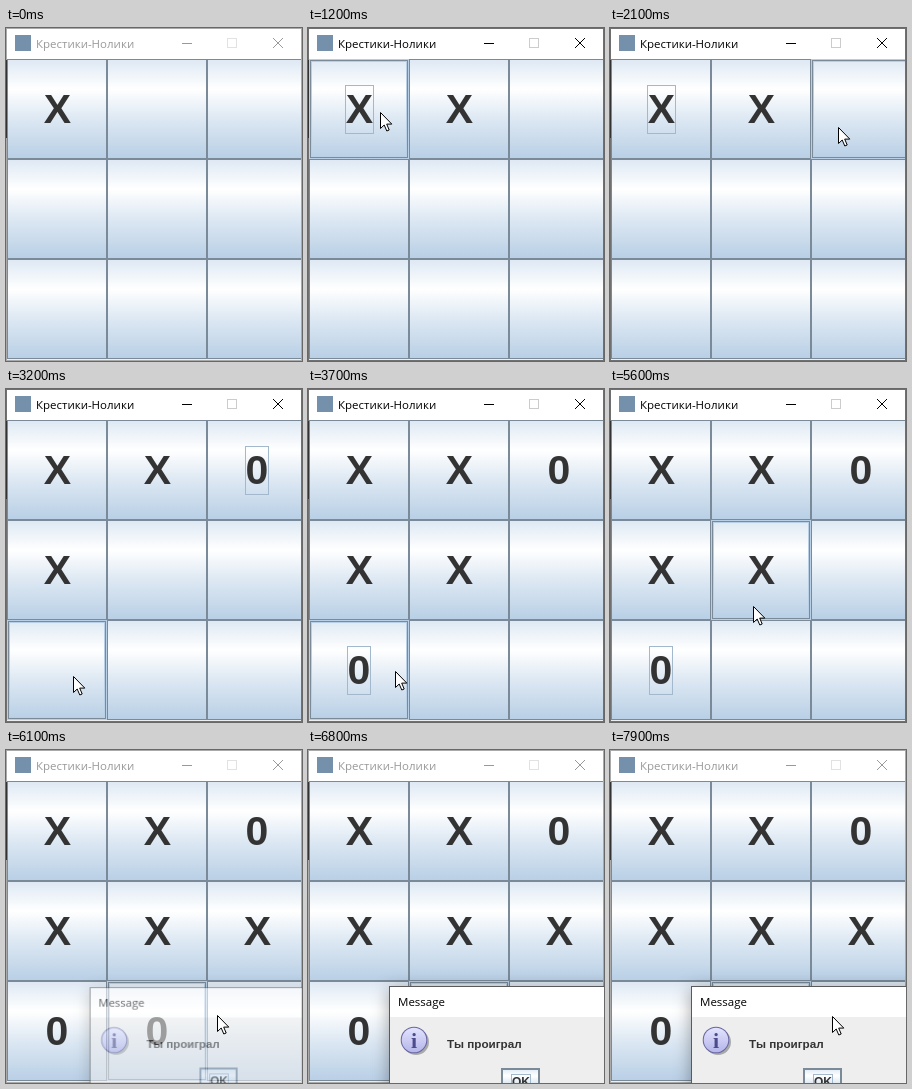
Write an HTML page with a canvas that moves like this. It is 296 by 333 pixels and loops after 8 s.

```html
<!DOCTYPE html>
<html lang="ru">
<head>
<meta charset="utf-8">
<style>
html, body { margin: 0; width: 100%; height: 100%; overflow: hidden; }
canvas { display: block; }
</style>
</head>
<body>
<canvas id="stage" width="296" height="333"></canvas>
<script>
const LOOP = 8000, STEP = 100, CELL = 100;
const DIALOG_AT = 6100, FADE = 200;
const UI = '11.5px "Open Sans", "Noto Sans", sans-serif';
const BOLD = '"Liberation Sans", Arial, sans-serif';
const EDGE = '#7a8a99', GLOW = '#b8cfe5', FOCUS = '#a3b8cc';
const ctx = document.getElementById('stage').getContext('2d');

// Each click may place a 0; the computer answers with an X on release
const turns = [
  { cell: 0, press: 1000, release: 1200, reply: 1 },
  { cell: 2, press: 2200, release: 2300, reply: 3 },
  { cell: 6, press: 3400, release: 3500, reply: 4 },
  { cell: 7, press: 5800, release: 5900, reply: 5 }
];

// Pointer glides from rest to rest: [start, end, x, y]
const origin = [62, 21];
const glides = [
  [400, 800, 72, 84], [1200, 1600, 163, 123], [1700, 2100, 228, 99],
  [2800, 3200, 67, 287], [3500, 4400, 227, 245], [4400, 5400, 143, 217],
  [5600, 5800, 152, 262], [6000, 6100, 211, 265], [6100, 6900, 230, 345],
  [7100, 7400, 210, 249], [7500, 7800, 222, 313], [7800, 7900, 222, 266]
];
const arrow = new Path2D('M.5 .5V16.5L4.2 13L6.8 19L9.2 18L6.7 12.1H11.8Z');

const progress = (t, from, to) => Math.min(1, Math.max(0, (t - from) / (to - from)));
const ease = k => k * k * (3 - 2 * k);

function fill(g, color, x, y, w, h) {
  g.fillStyle = color;
  g.fillRect(x, y, w, h);
}

function frame(g, color, x, y, w, h) {
  g.strokeStyle = color;
  g.strokeRect(x + .5, y + .5, w - 1, h - 1);
}

function text(g, str, font, color, x, y) {
  g.font = font;
  g.fillStyle = color;
  g.fillText(str, x, y);
}

function disc(g, color, x, y, r) {
  g.fillStyle = color;
  g.beginPath();
  g.arc(x, y, r, 0, 7);
  g.fill();
}

function gradient(g, y, h, stops) {
  const shade = g.createLinearGradient(0, y, 0, y + h);
  for (const [at, color] of stops) shade.addColorStop(at, color);
  return shade;
}

function button(g, x, y, w, h, hover, pressed) {
  const shade = gradient(g, y, h, [[0, '#dde8f3'], [.3, '#fff'], [.6, '#dde8f3'], [1, GLOW]]);
  fill(g, pressed ? GLOW : shade, x, y, w, h);
  const rings = hover ? [GLOW, EDGE, GLOW] : [EDGE];
  rings.forEach((color, i) => frame(g, color, x + i, y + i, w - 2 * i, h - 2 * i));
}

function makeDialog() {
  const layer = document.createElement('canvas');
  layer.width = layer.height = 380;
  const g = layer.getContext('2d');
  g.shadowColor = 'rgba(0,0,0,.35)';
  g.shadowBlur = 16;
  g.shadowOffsetY = 3;
  fill(g, '#5a5a5a', 81, 236, 262, 115);
  g.shadowColor = 'transparent';
  fill(g, '#fff', 82, 237, 260, 30);
  fill(g, '#eee', 82, 267, 260, 83);
  text(g, 'Message', UI, '#000', 90, 256);

  disc(g, '#aaa', 108, 292, 13);
  disc(g, '#6666a0', 106, 290, 13.3);
  disc(g, gradient(g, 277, 26, [[0, '#e4e4ff'], [1, '#b4b4ea']]), 106, 290, 12.3);
  text(g, 'i', 'bold 22px "Liberation Serif", serif', '#4c4c8c', 103, 298);

  text(g, 'Ты проиграл', 'bold 11.7px ' + BOLD, '#333', 139, 298);
  button(g, 193, 318, 39, 26);
  frame(g, EDGE, 194, 319, 37, 24);
  frame(g, FOCUS, 203, 324, 20, 16);
  text(g, 'OK', 'bold 12px ' + BOLD, '#333', 204, 336);
  return layer;
}
const dialog = makeDialog();

function pointer(t) {
  let [x, y] = origin;
  for (const [from, to, toX, toY] of glides) {
    const k = ease(progress(t, from, to));
    x += (toX - x) * k;
    y += (toY - y) * k;
  }
  return [Math.round(x), Math.round(y)];
}

function cellAt([x, y]) {
  return y < 31 ? -1 : Math.floor((x - 1) / CELL) + 3 * Math.floor((y - 31) / CELL);
}

function markAt(n, t) {
  if (n === 0) return 'X';
  const turn = turns.find(m => t >= m.release && (m.cell === n || m.reply === n));
  return turn && (turn.cell === n ? '0' : 'X');
}

function drawWindow(active) {
  fill(ctx, '#fff', 0, 0, 296, 333);
  fill(ctx, '#eee', 1, 31, 294, 301);
  frame(ctx, active ? '#707070' : '#aaa', 0, 0, 296, 333);
  fill(ctx, '#333', 0, 32, 1, 78);
  fill(ctx, '#7590ab', 9, 7, 16, 16);
  text(ctx, 'Крестики-Нолики', UI, active ? '#000' : '#999', 30, 20);
  const ink = active ? '#000' : '#999';
  fill(ctx, ink, 176, 15, 10, 1);
  frame(ctx, active ? '#ccc' : '#e2e2e2', 221, 10, 10, 10);
  ctx.strokeStyle = ink;
  ctx.stroke(new Path2D('M267 10l10 10m0-10l-10 10'));
}

function drawBoard(t) {
  // The open dialog blocks the board, so its hover state freezes
  const hover = t < 400 ? -1 : cellAt(pointer(Math.min(t, DIALOG_AT - STEP)));
  const turn = turns.findLast(m => t >= m.press);
  ctx.save();
  ctx.beginPath();
  ctx.rect(1, 31, 294, 300);
  ctx.clip();
  for (let n = 0; n < 9; n++) {
    const x = 1 + n % 3 * CELL, y = 31 + Math.floor(n / 3) * CELL;
    const current = turn && turn.cell === n;
    button(ctx, x, y, CELL, CELL, n === hover, current && t < turn.release);
    const mark = markAt(n, t);
    if (!mark) continue;
    const width = mark === 'X' ? 27 : 22;
    const left = x + Math.ceil((CELL - width) / 2);
    if (current && t < DIALOG_AT) frame(ctx, FOCUS, left - 1, y + 26, width + 2, 49);
    ctx.textAlign = 'center';
    text(ctx, mark, 'bold 41px ' + BOLD, '#333', left + width / 2, y + 64);
  }
  ctx.restore();
}

function drawDialog(t) {
  const k = progress(t, DIALOG_AT, DIALOG_AT + FADE), scale = .98 + .02 * k;
  ctx.save();
  ctx.globalAlpha = .57 + .43 * k;
  ctx.translate(212, 293);
  ctx.scale(scale, scale);
  ctx.drawImage(dialog, -212, -293);
  ctx.restore();
}

function drawPointer(t) {
  ctx.save();
  ctx.translate(...pointer(t));
  ctx.fillStyle = '#fff';
  ctx.strokeStyle = '#000';
  ctx.fill(arrow);
  ctx.stroke(arrow);
  ctx.restore();
}

const start = performance.now();
function tick() {
  // The picture advances in tenths of a second
  const t = Math.floor((performance.now() - start) % LOOP / STEP) * STEP;
  drawWindow(t >= turns[0].press && t < DIALOG_AT);
  drawBoard(t);
  if (t >= DIALOG_AT) drawDialog(t);
  if (t >= glides[0][0]) drawPointer(t);
  requestAnimationFrame(tick);
}
tick();
</script>
</body>
</html>
```
